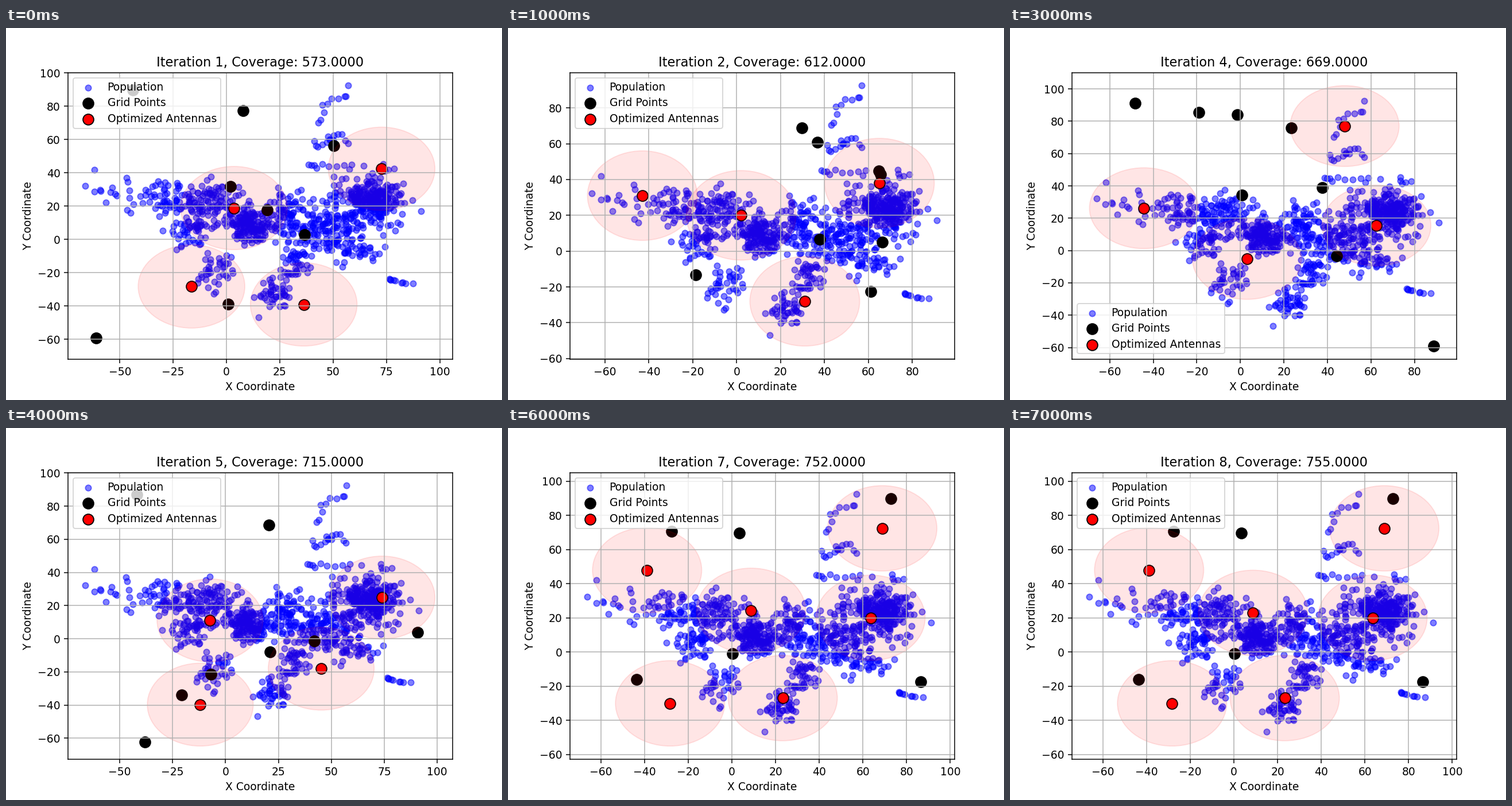
These frames come from a looping animation (864x648 px, 8000 ms). A matplotlib script:

```python
import numpy as np
import matplotlib.pyplot as plt
from matplotlib.animation import FuncAnimation

RADIUS = 25
rng = np.random.default_rng(11)


def blob(x, y, sx, sy, count):
    """Gaussian cloud without its far tails."""
    z = rng.normal(size=(count * 3, 2))
    z = z[np.hypot(*z.T) < 2.2][:count]
    return z * (sx, sy) + (x, y)


def trail(path, count, jitter):
    """Points spread evenly along a polyline, slightly scattered."""
    x, y = np.transpose(path)
    t = np.linspace(0, len(path) - 1, count)
    line = np.column_stack([np.interp(t, range(len(path)), c) for c in (x, y)])
    return line + rng.uniform(-jitter, jitter, line.shape)


population = np.vstack([
    # east
    blob(66, 23, 10, 11, 180), blob(69, 24, 6, 5.5, 110),
    blob(53, 12, 5, 9, 45), blob(62, -7, 7, 6, 42),
    # centre
    blob(11, 8, 5, 5.5, 140), blob(28, 14, 7, 8.5, 95),
    blob(42, 5, 6, 7, 70),
    # west
    blob(-8, 21, 9, 8.5, 125), blob(-17, 5, 6, 6, 45),
    blob(-30, 25, 5, 6, 36), blob(-45, 29, 8.5, 7, 22),
    # south
    blob(-5, -20, 4.5, 6.5, 38), blob(32, -15, 5, 5.5, 42),
    blob(22, -32, 5, 4.5, 42),
    # north and south-east trails
    trail([(42, 56), (47, 62), (57, 60)], 14, 2.5),
    trail([(43, 70), (47, 83), (57, 87)], 9, 1.5),
    trail([(37, 46), (56, 43)], 9, 2),
    trail([(75, -25), (86, -26)], 9, 1.5),
    # outermost points
    [(-66.1, 32.3), (-61.9, 42), (57, 92.4), (91.2, 17.1), (15, -46.8)],
])


def late_antennas(west_y, centre_y):
    return [(68.9, 72.4), (-38.8, west_y), (8.8, centre_y), (63.5, 20),
            (23.3, -27), (-28.3, -30.1)]


late_grid = [(72.8, 89.7), (-27.7, 70.8), (3.4, 69.6), (0.4, -0.9),
             (-43.5, -16), (86.4, -17.4)]

# coverage, legend place, antennas, grid points
STEPS = [
    (573, "upper left",
     [(72.7, 42.5), (3.5, 18.9), (-16.4, -28.2), (36.2, -39)],
     [(-43.8, 89.9), (7.8, 77.3), (50.3, 56.5), (1.9, 32), (19.1, 17.7),
      (36.5, 2.9), (0.7, -38.8), (-61, -59)]),
    (612, "upper left",
     [(65, 38), (2, 20), (-43, 31), (31, -28)],
     rng.uniform(-60, 85, (8, 2))),
    (643, "upper center",
     [(-45.8, 45.4), (0.7, 21.1), (51.6, 15.4)],
     [(59.3, 91.1), (1.3, 66.9), (8.6, 58.9), (69.6, 41.5), (-45.8, 34.8),
      (1.7, 28.2), (-31.1, 12.2), (2.6, -15.1), (31.2, -47.4)]),
    (669, "lower left",
     [(47.9, 77), (-44.3, 26.2), (3, -5.2), (62.5, 15.5)],
     [(-48.2, 91.3), (-19.1, 85.3), (-1.3, 84), (23.4, 75.7), (0.8, 34.4),
      (37.6, 38.9), (44.2, -3.4), (88.9, -59.1)]),
    (715, "upper left",
     [(73.9, 24.9), (-7.3, 11.1), (45.2, -18), (-11.9, -39.7)],
     [(-41.9, 87), (20.6, 68.5), (90.6, 4), (42, -1.3), (21, -7.8),
      (-6.9, -21.3), (-20.6, -34), (-37.9, -62.3)]),
    (734, "lower right", late_antennas(51.1, 24.1),
     [(72.8, 89.8), (-34.7, 68.4), (20.9, 26.2), (20.6, -39.8), (4.7, -64.1),
      (30.4, -53.1)]),
    (752, "upper left", late_antennas(47.9, 24.1), late_grid),
    (755, "upper left", late_antennas(47.9, 22.9), late_grid),
]

fig, ax = plt.subplots(figsize=(6.4, 4.8), dpi=135)


def draw(i):
    coverage, place, antennas, grid = STEPS[i]
    ax.clear()
    ax.scatter(*population.T, s=30, c="blue", alpha=0.5, label="Population")
    ax.scatter(*zip(*grid), s=100, c="black", label="Grid Points")
    ax.scatter(*zip(*antennas), s=100, c="red", edgecolors="black",
               label="Optimized Antennas")
    for center in antennas:
        ax.add_patch(plt.Circle(center, RADIUS, color="red", alpha=0.1))
    ax.autoscale_view()
    ax.set_title(f"Iteration {i + 1}, Coverage: {coverage:.4f}")
    ax.set_xlabel("X Coordinate")
    ax.set_ylabel("Y Coordinate")
    ax.legend(loc=place, labelspacing=0.45, borderpad=0.36)
    ax.grid(True)
    return []


anim = FuncAnimation(fig, draw, frames=len(STEPS), init_func=lambda: draw(0),
                     interval=1000, repeat=True, repeat_delay=0)
plt.show()
```
